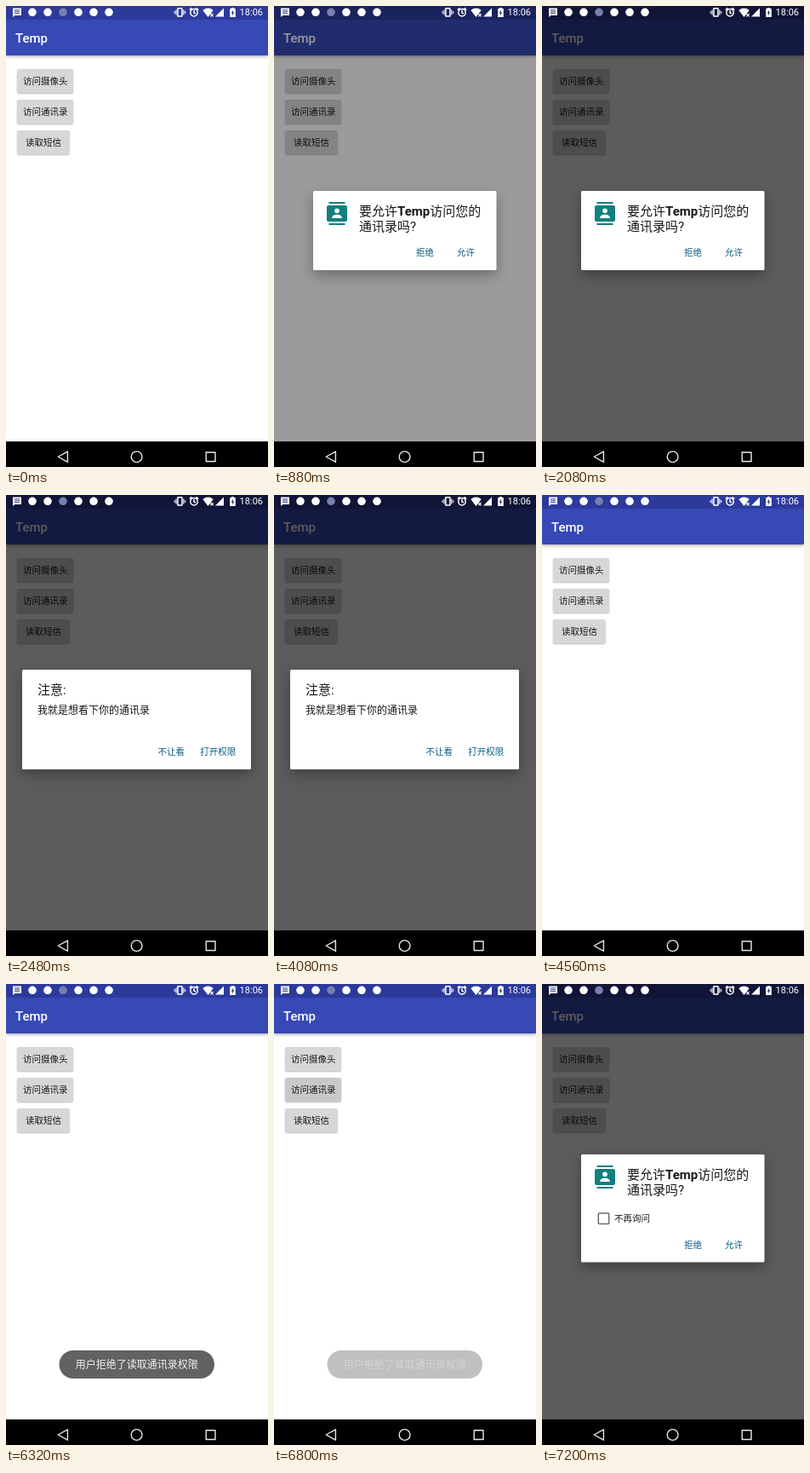
An HTML page with a canvas for the animation above (8 s loop, 308 px wide and 541 px high).

```html
<!DOCTYPE html>
<html lang="zh-CN">
<head>
<meta charset="utf-8">
<title>Temp</title>
<style>
html, body { margin: 0; width: 308px; height: 541px; overflow: hidden; background: #fff; }
canvas { display: block; width: 308px; height: 541px; }
</style>
</head>
<body>
<canvas id="stage"></canvas>
<script>
const W = 308, H = 541, LOOP = 8000, STEP = 80, NAV_TOP = 511;
const FONT = 'Roboto, "Noto Sans CJK SC", "Noto Sans CJK", sans-serif';
const ACCENT = '#0b5f80', INK = '#181818';
const canvas = document.getElementById('stage');
const ctx = canvas.getContext('2d');
const dpr = window.devicePixelRatio || 1;
canvas.width = W * dpr;
canvas.height = H * dpr;

const ramp = (t, from, to) => Math.min(1, Math.max(0, (t - from) / (to - from)));
const easeOut = p => 1 - (1 - p) * (1 - p);

function rect(x, y, w, h, color) {
  ctx.fillStyle = color;
  ctx.fillRect(x, y, w, h);
}

function roundRect(x, y, w, h, r) {
  ctx.beginPath();
  ctx.roundRect(x, y, w, h, r);
}

function disc(x, y, r, color) {
  ctx.fillStyle = color;
  ctx.beginPath();
  ctx.arc(x, y, r, 0, Math.PI * 2);
  ctx.fill();
}

function poly(points, color) {
  ctx.fillStyle = color;
  ctx.beginPath();
  points.forEach(([x, y]) => ctx.lineTo(x, y));
  ctx.closePath();
  ctx.fill();
}

// Draws text vertically centred on cy and returns its width.
function text(str, x, cy, size, color = INK, weight = 400, align = 'left') {
  ctx.font = `${weight} ${size}px ${FONT}`;
  ctx.textAlign = align;
  ctx.fillStyle = color;
  ctx.fillText(str, x, cy + size * 0.37);
  return ctx.measureText(str).width;
}

function withShadow(color, blur, dy, draw) {
  ctx.save();
  ctx.shadowColor = color;
  ctx.shadowBlur = blur * dpr;
  ctx.shadowOffsetY = dy * dpr;
  draw();
  ctx.restore();
}

// Touch feedback: grows from the centre of a box, then fades.
function ripple(t, start, x, y, w, h) {
  const alpha = 0.13 * ramp(t, start, start + 160) * (1 - ramp(t, start + 320, start + 640));
  if (alpha <= 0) return;
  ctx.save();
  roundRect(x, y, w, h, 2);
  ctx.clip();
  const reach = easeOut(ramp(t, start, start + 320)) * w * 0.65;
  disc(x + w / 2, y + h / 2, reach, `rgba(0,0,0,${alpha})`);
  ctx.restore();
}

function button(label, y, w) {
  withShadow('rgba(0,0,0,.28)', 2, 1, () => {
    roundRect(13, y, w, 28, 2);
    ctx.fillStyle = '#d6d7d7';
    ctx.fill();
  });
  text(label, 13.3 + w / 2, y + 14, 10.5, INK, 400, 'center');
}

function drawApp(t) {
  rect(0, 0, W, H, '#fff');
  withShadow('rgba(0,0,0,.4)', 4, 1, () => rect(0, 0, W, 58, '#3649b5'));
  rect(0, 0, W, 16, '#2c3a9b');
  text('Temp', 11, 37.8, 15, '#fff', 500);
  button('访问摄像头', 74, 66);
  button('访问通讯录', 110, 66);
  button('读取短信', 146, 61.5);
  for (const start of [240, 6320]) ripple(t, start, 13, 110, 66, 28);
}

function drawStatusIcons() {
  const white = '#fff', bar = '#20296a';
  poly([[8, 2.5], [18, 2.5], [18, 11], [10.5, 11], [8, 13]], white);
  for (const y of [4.8, 6.8, 8.8]) rect(10, y - 0.4, 6, 0.9, bar);
  for (const x of [31, 49, 85, 103, 121]) disc(x, 7.3, 4.8, white);
  disc(67, 7.3, 4.8, '#7780b0');

  ctx.strokeStyle = white;
  ctx.lineWidth = 1.5;
  ctx.strokeRect(201.9, 2.8, 5, 9.2);
  rect(199.4, 4.5, 1.2, 6, white);
  rect(197.6, 6, 1, 3, white);
  rect(208.2, 4.5, 1.2, 6, white);
  rect(210.2, 6, 1, 3, white);

  ctx.beginPath();
  ctx.arc(221, 7.7, 4.2, 0, Math.PI * 2);
  ctx.moveTo(221, 5); ctx.lineTo(221, 8); ctx.lineTo(223, 9.2);
  ctx.moveTo(215.8, 4.6); ctx.lineTo(218.4, 2.4);
  ctx.moveTo(226.2, 4.6); ctx.lineTo(223.6, 2.4);
  ctx.stroke();

  ctx.fillStyle = white;
  ctx.beginPath();
  ctx.moveTo(237.5, 13);
  ctx.lineTo(231.3, 5);
  ctx.quadraticCurveTo(237.5, 0.2, 243.7, 5);
  ctx.fill();
  ctx.lineWidth = 1.1;
  ctx.beginPath();
  ctx.moveTo(240.3, 9); ctx.lineTo(243.6, 12.4);
  ctx.moveTo(243.6, 9); ctx.lineTo(240.3, 12.4);
  ctx.stroke();

  poly([[246, 12.5], [256, 12.5], [256, 2.5]], white);
  rect(263.2, 3, 6.6, 10, white);
  rect(265, 2, 3, 1, white);
  poly([[267.2, 4.5], [264.7, 8.5], [266.2, 8.5], [265.8, 11.5], [268.3, 7.5], [266.8, 7.5]], bar);
  text('18:06', 302, 7.4, 11, white, 400, 'right');
}

function drawNavBar() {
  rect(0, NAV_TOP, W, H - NAV_TOP, '#000');
  ctx.strokeStyle = '#e8e8e8';
  ctx.lineWidth = 1.4;
  ctx.lineJoin = 'round';
  ctx.beginPath();
  ctx.moveTo(61.2, 529); ctx.lineTo(72.4, 522.8); ctx.lineTo(72.4, 535.2);
  ctx.closePath();
  ctx.stroke();
  ctx.beginPath();
  ctx.arc(153.6, 529, 6.4, 0, Math.PI * 2);
  ctx.stroke();
  ctx.strokeRect(235.2, 523.7, 10.8, 10.8);
}

function drawContactIcon(x, y) {
  const teal = '#12807f';
  rect(x + 2.5, y, 19, 2, teal);
  rect(x + 2.5, y + 25, 19, 2, teal);
  roundRect(x, y + 4, 24, 19, 2);
  ctx.fillStyle = teal;
  ctx.fill();
  disc(x + 12, y + 10.2, 2.8, '#fff');
  ctx.beginPath();
  ctx.moveTo(x + 6, y + 19);
  ctx.bezierCurveTo(x + 6, y + 13.2, x + 18, y + 13.2, x + 18, y + 19);
  ctx.fill();
}

// Fades and scales a dialog card in and out around its centre.
function dialog(x, y, w, h, enter, leave, content) {
  const alpha = enter * (1 - leave);
  if (alpha <= 0) return;
  const scale = 0.9 + 0.1 * enter;
  ctx.save();
  ctx.globalAlpha = alpha;
  ctx.translate(x + w / 2, y + h / 2);
  ctx.scale(scale, scale);
  ctx.translate(-x - w / 2, -y - h / 2);
  withShadow('rgba(0,0,0,.3)', 15, 6, () => {
    roundRect(x, y, w, h, 1.5);
    ctx.fillStyle = '#fff';
    ctx.fill();
  });
  content();
  ctx.restore();
}

function permissionDialog(t, shown, hidden, askAgain) {
  const top = askAgain ? 200 : 217, height = askAgain ? 126.5 : 93;
  const enter = easeOut(ramp(t, shown, shown + 150));
  const leave = ramp(t, hidden, hidden + 150);
  dialog(46, top, 215.5, height, enter, leave, () => {
    drawContactIcon(62, top + 13);
    let x = 100;
    x += text('要允许', x, top + 23.5, 15);
    x += text('Temp', x, top + 23.5, 15, INK, 700);
    text('访问您的', x, top + 23.5, 15);
    text('通讯录吗?', 100, top + 41, 15);
    if (askAgain) {
      ctx.strokeStyle = '#6c6c6c';
      ctx.lineWidth = 1.5;
      roundRect(66.3, 269, 12.4, 12.4, 1);
      ctx.stroke();
      text('不再询问', 85, 275.3, 10.5);
    }
    const actions = top + height - 20.7;
    text('拒绝', 167, actions, 10.5, ACCENT, 500);
    text('允许', 215, actions, 10.5, ACCENT, 500);
    if (!askAgain) ripple(t, 2080, 155, actions - 13, 45, 26);
  });
}

function noticeDialog(t) {
  const enter = easeOut(ramp(t, 2260, 2440));
  const leave = ramp(t, 4280, 4440);
  dialog(19, 205, 269, 117, enter, leave, () => {
    text('注意:', 37, 228.5, 15);
    text('我就是想看下你的通讯录', 37, 252.7, 12);
    text('不让看', 178.5, 301.3, 10.5, ACCENT, 500);
    text('打开权限', 228.3, 301.3, 10.5, ACCENT, 500);
    ripple(t, 4080, 172, 288, 45, 26);
  });
}

function toast(t) {
  const alpha = ramp(t, 4640, 5120) * (1 - ramp(t, 6560, 6960));
  if (alpha <= 0) return;
  ctx.save();
  ctx.globalAlpha = alpha;
  roundRect(62.5, 430, 182.5, 33, 16.5);
  ctx.fillStyle = '#626262';
  ctx.fill();
  text('用户拒绝了读取通讯录权限', 153.7, 446.7, 12, '#f2f2f2', 400, 'center');
  ctx.restore();
}

function draw(t) {
  ctx.setTransform(dpr, 0, 0, dpr, 0, 0);
  drawApp(t);
  const dim = 0.64 * (ramp(t, 720, 980) - ramp(t, 4280, 4520) + ramp(t, 6800, 7060));
  rect(0, 0, W, NAV_TOP, `rgba(0,0,0,${dim})`);
  permissionDialog(t, 720, 2200, false);
  noticeDialog(t);
  permissionDialog(t, 6800, LOOP, true);
  toast(t);
  drawStatusIcons();
  drawNavBar();
}

const origin = performance.now();
function tick() {
  const t = (performance.now() - origin) % LOOP;
  draw(Math.floor(t / STEP) * STEP);
  requestAnimationFrame(tick);
}
tick();
</script>
</body>
</html>
```
